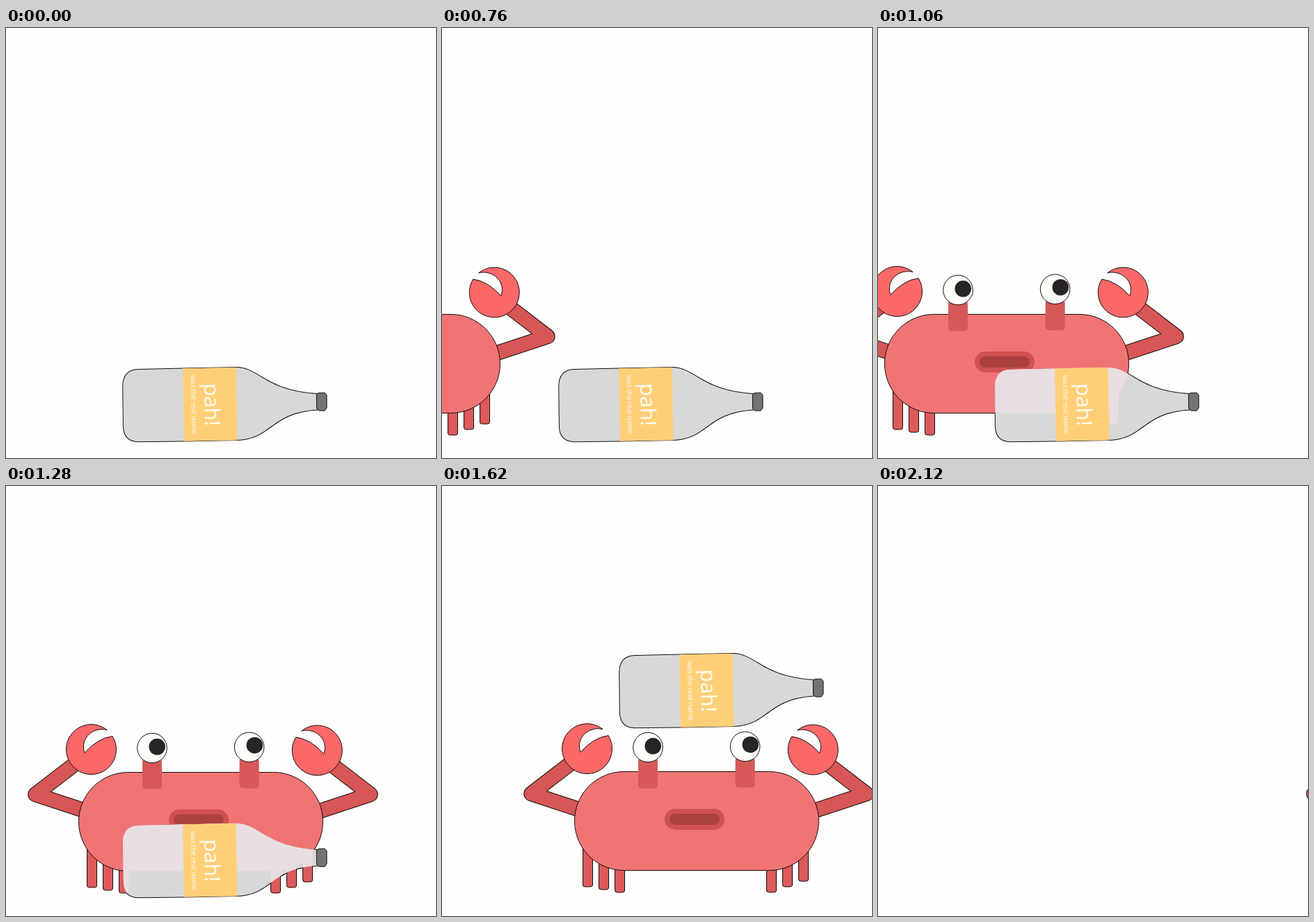
Recreate the animation shown at these times as an HTML page with a canvas. Size 618 by 618 pixels, loop 2360 ms.

```html
<!DOCTYPE html>
<html lang="en">
<head>
<meta charset="utf-8">
<title>Crab and bottle</title>
<style>
html, body { margin: 0; width: 100%; height: 100%; overflow: hidden; background: #fefefe; }
canvas { display: block; width: 618px; height: 618px; }
</style>
</head>
<body>
<canvas id="stage" width="618" height="618"></canvas>
<script>
const ctx = document.getElementById('stage').getContext('2d');
const LOOP = 2360, STEP = 20, REST = -86;
const INK = '#140d0d';
const FONT = '"Open Sans", "Noto Sans", sans-serif';

// Horizontal travel of the crab: [ms, px]
const walk = [
  [520, -621], [540, -618], [760, -458], [1060, -181], [1220, REST],
  [1490, REST], [1600, -36.5], [1620, 0], [1840, 229], [2120, 498]
];
const LIFT = [1265, 1495];

// Monotone cubic interpolation through the keys
function track(keys, t) {
  const last = keys.length - 1;
  if (t <= keys[0][0]) return keys[0][1];
  if (t >= keys[last][0]) return keys[last][1];
  const rate = i => (keys[i + 1][1] - keys[i][1]) / (keys[i + 1][0] - keys[i][0]);
  const slope = i => {
    if (i === 0) return 0;
    if (i === last) return rate(i - 1);
    const a = rate(i - 1), b = rate(i);
    return a * b <= 0 ? 0 : 2 * a * b / (a + b);
  };
  let i = 0;
  while (t > keys[i + 1][0]) i++;
  const [t0, p0] = keys[i], [t1, p1] = keys[i + 1];
  const h = t1 - t0, u = (t - t0) / h, v = 1 - u;
  return p0 * (1 + 2 * u) * v * v + h * slope(i) * u * v * v
       + p1 * u * u * (3 - 2 * u) - h * slope(i + 1) * u * u * v;
}

function smooth(t, [a, b]) {
  const u = Math.min(1, Math.max(0, (t - a) / (b - a)));
  return u * u * (3 - 2 * u);
}

function paint(path, fill, line) {
  ctx.fillStyle = fill;
  ctx.fill(path);
  if (line) outline(path, line);
}

function outline(path, width) {
  ctx.strokeStyle = INK;
  ctx.lineWidth = width;
  ctx.stroke(path);
}

function box(x0, y0, x1, y1, r) {
  const p = new Path2D();
  p.roundRect(x0, y0, x1 - x0, y1 - y0, r);
  return p;
}

function disc(x, y, r) {
  const p = new Path2D();
  p.arc(x, y, r, 0, Math.PI * 2);
  return p;
}

const claw = new Path2D();
claw.arc(0, 0, 36, Math.atan2(-28, -22.7), Math.atan2(-19, -30.6));
claw.quadraticCurveTo(-9, -16, 9.5, 5);
claw.bezierCurveTo(17, -16, -3, -33, -22.7, -28);
claw.closePath();

const arm = new Path2D('M547 394 L609.7 442.3 L533 467.5');

const legs = [
  [202, 576], [225, 580], [248, 584], [466, 584], [489, 576], [512, 568]
].map(([x, y]) => box(x + .5, 500, x + 14.5, y, 3));

// With a tint, the crab is one flat silhouette without outlines
function crab(x, y, tint) {
  const put = (path, fill, line) => paint(path, tint || fill, tint ? 0 : line);
  ctx.save();
  ctx.translate(x, y);
  ctx.lineJoin = 'round';

  for (const leg of legs) put(leg, '#dc5a5a', 1);

  for (const flip of [false, true]) {
    ctx.save();
    if (flip) {
      ctx.translate(738, 0);
      ctx.scale(-1, 1);
    }
    for (const [w, c] of [[22, INK], [20, '#d75656']]) {
      ctx.lineWidth = w;
      ctx.strokeStyle = tint || c;
      ctx.stroke(arm);
    }
    ctx.translate(flip ? 529.5 : 533.3, flip ? 377.6 : 379);
    put(claw, '#fa6868', 1);
    ctx.restore();
  }

  put(box(190.5, 410.5, 541.5, 552.5, 71), '#f07474', 1);

  for (const [ex, ey, px, py] of [[296, 375.6, 303.2, 373.8], [435.6, 374.4, 443.3, 371.7]]) {
    put(box(ex - 14, ey + 15, ex + 14, ey + 59, 5), '#d65858');
    put(disc(ex, ey, 21.3), '#fdfdfa', 1);
    put(disc(px, py, 11.8), '#282423');
  }

  put(box(320, 464, 406, 494, 15), '#cf5152');
  put(box(327, 471, 399, 487, 8), '#aa4140');
  ctx.restore();
}

const glass = new Path2D(`M190 491 L255 489.5 L331 488
  C364 488.5 373 521.5 447 526 L447 548.5 C380 552.5 382 590.5 332 592
  L256 593.5 L190 594.3 Q169 593.5 168.9 572 L168.2 514 Q169 491.5 190 491 Z`);
const label = new Path2D('M254 489.2 L330.5 487.8 L332.5 592.4 L256 593.8 Z');
const cap = new Path2D(`M449 524.5 L458 524.2 L461 527.5 L461 546
  L458 550 L450 550 L446.5 547 L446.3 527 Z`);

function caption(text, x, y, size) {
  ctx.save();
  ctx.translate(x, y);
  ctx.rotate(Math.PI * 89 / 180);
  ctx.font = size + 'px ' + FONT;
  ctx.textAlign = 'center';
  ctx.fillStyle = '#fffdf6';
  ctx.fillText(text, 0, 0);
  ctx.restore();
}

// The bottle's outline lies behind the crab, its glass in front
function scene(crabX, crabY, x, y, walking) {
  ctx.save();
  ctx.translate(x, y);
  outline(glass, 2);
  if (walking) crab(crabX - x, crabY - y);
  paint(glass, '#d9d8d8');

  // Pale crab seen through the glass
  ctx.save();
  ctx.clip(glass);
  crab(crabX - x, crabY - y, '#e8dee1');
  ctx.restore();

  paint(label, '#ffcf78');
  paint(cap, '#747474', 1);
  caption('pah!', 285.5, 541.5, 30);
  caption('was the real name', 266.5, 541.5, 10);
  ctx.restore();
}

function draw(t) {
  ctx.fillStyle = '#fefefe';
  ctx.fillRect(0, 0, 618, 618);
  const x = track(walk, t);
  const up = smooth(t, LIFT);
  scene(x, 1 - up, Math.max(0, x - REST) + up, -247 * up, t >= 540);
}

const start = performance.now();
function frame() {
  const t = (performance.now() - start) % LOOP;
  draw(Math.floor(t / STEP) * STEP);
  requestAnimationFrame(frame);
}
frame();
</script>
</body>
</html>
```
